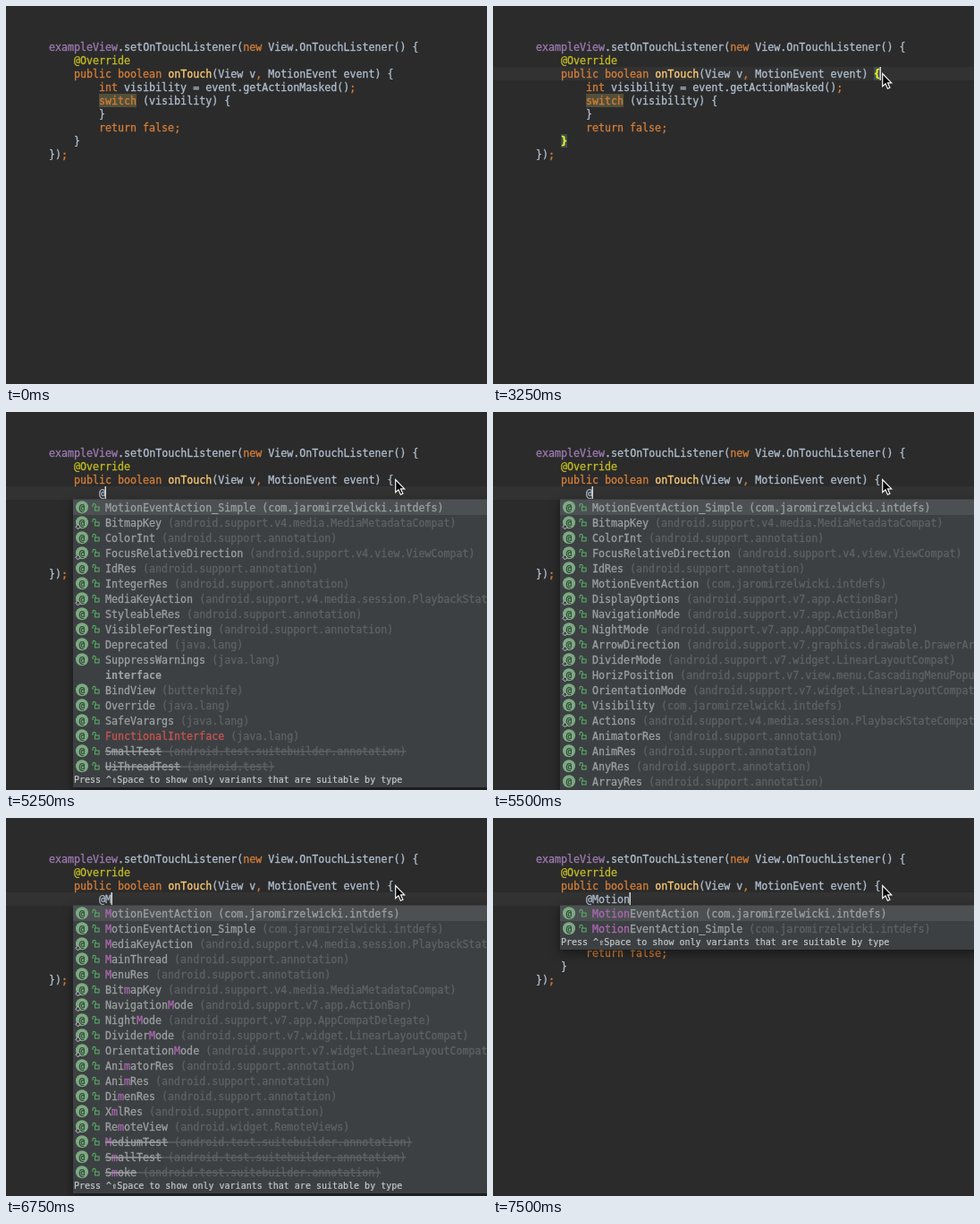
These frames come from a looping animation (538 px wide and 422 px high, 8000 ms). An HTML page:

```html
<!DOCTYPE html>
<html lang="en">
<head>
<meta charset="utf-8">
<title>Code completion</title>
<style>
  html, body { margin: 0; width: 100%; height: 100%; overflow: hidden; background: #2b2b2b; }
  svg { display: block; width: 538px; height: 422px; }
  /* about 7px per character; the thin stroke thickens the glyphs */
  text {
    font: 11.65px "DejaVu Sans Mono", monospace; white-space: pre;
    color: #b0bece; fill: currentColor; stroke: currentColor; stroke-width: .3px;
  }
  .field { color: #9d7bb2; }
  .note { color: #c2bc24; }
  .key { color: #d47e38; }
  .method { color: #ffcc74; }
  .brace { color: #ffef28; font-weight: bold; }
  .panel { fill: #3c4042; filter: drop-shadow(0 4px 6px rgba(0, 0, 0, .45)); }
  .name { color: #9c9fa0; }
  .pkg { color: #5f6264; }
  .picked .pkg { color: #9c9fa0; }
  .hit { color: #ab68b1; }
  .red { color: #c75450; }
  .gone tspan { text-decoration: line-through; }
  .gone .hit { text-decoration: none; }
  .word { color: #a2a6a8; font-weight: bold; stroke: none; }
  .at { font-size: 10.5px; color: #2c4032; text-anchor: middle; }
  .hint { font-size: 10px; color: #c6c8c9; stroke-width: .2px; }
</style>
</head>
<body>
<svg viewBox="0 0 538 422">
  <defs>
    <g id="badge">
      <circle cx="85" cy="8.3" r="7" fill="#7daa83"/>
      <text class="at" x="85" y="11.5">@</text>
      <g fill="none" stroke="#5aa866" stroke-width="1.1">
        <path d="M97 8V6a1.6 1.6 0 0 1 3.2 0V8"/>
        <rect x="99.5" y="8" width="4.6" height="4"/>
      </g>
    </g>
    <path id="nested" d="M80.5 10.5l2.7 2.7-2.7 2.7-2.7-2.7z" fill="#44494b" stroke="#c0c5c7"/>
  </defs>
  <g id="editor"></g>
  <g id="popup"></g>
  <path id="mouse" d="M0 0V14.2L3.3 11.2L5.7 16.8L8.2 15.7L5.8 10.3H10Z"
        fill="#050505" stroke="#f4f4f4" stroke-width="1.2"/>
</svg>
<script>
const LOOP = 8000, LINE = 15, ROW = 17, CHAR = 7, LEFT = 48, TOP = 38, LIST_TOP = 98;
const $ = id => document.getElementById(id);

const code = [
  'exampleView.setOnTouchListener(new View.OnTouchListener() {',
  '    @Override',
  '    public boolean onTouch(View v, MotionEvent event) {',
  '        int visibility = event.getActionMasked();',
  '        switch (visibility) {',
  '        }',
  '        return false;',
  '    }',
  '});'
];

const note = 'android.support.annotation', lang = 'java.lang', own = 'com.jaromirzelwicki.intdefs';
const v4 = 'android.support.v4.', v7 = 'android.support.v7.', test = 'android.test';
const packages = {
  MotionEventAction: own, MotionEventAction_Simple: own, Visibility: own,
  BitmapKey: v4 + 'media.MediaMetadataCompat',
  FocusRelativeDirection: v4 + 'view.ViewCompat',
  MediaKeyAction: v4 + 'media.session.PlaybackStateCompat',
  Actions: v4 + 'media.session.PlaybackStateCompat',
  DisplayOptions: v7 + 'app.ActionBar',
  NavigationMode: v7 + 'app.ActionBar',
  NightMode: v7 + 'app.AppCompatDelegate',
  ArrowDirection: v7 + 'graphics.drawable.DrawerArrowDrawable',
  DividerMode: v7 + 'widget.LinearLayoutCompat',
  OrientationMode: v7 + 'widget.LinearLayoutCompat',
  HorizPosition: v7 + 'view.menu.CascadingMenuPopup',
  RemoteView: 'android.widget.RemoteViews',
  Deprecated: lang, SuppressWarnings: lang, Override: lang, SafeVarargs: lang, FunctionalInterface: lang,
  BindView: 'butterknife',
  SmallTest: test + '.suitebuilder.annotation',
  MediumTest: test + '.suitebuilder.annotation',
  Smoke: test + '.suitebuilder.annotation',
  UiThreadTest: test
};

const words = s => s.split(' ');
const first = words('MotionEventAction_Simple BitmapKey ColorInt FocusRelativeDirection IdRes IntegerRes ' +
  'MediaKeyAction StyleableRes VisibleForTesting Deprecated SuppressWarnings interface BindView Override ' +
  'SafeVarargs FunctionalInterface SmallTest UiThreadTest');
const full = words('MotionEventAction_Simple BitmapKey ColorInt FocusRelativeDirection IdRes MotionEventAction ' +
  'DisplayOptions NavigationMode NightMode ArrowDirection DividerMode HorizPosition OrientationMode Visibility ' +
  'Actions AnimatorRes AnimRes AnyRes ArrayRes ColorRes');
const withM = words('MotionEventAction MotionEventAction_Simple MediaKeyAction MainThread MenuRes BitmapKey ' +
  'NavigationMode NightMode DividerMode OrientationMode AnimatorRes AnimRes DimenRes XmlRes RemoteView ' +
  'MediumTest SmallTest Smoke');
const withMo = words('MotionEventAction MotionEventAction_Simple NavigationMode NightMode DividerMode ' +
  'OrientationMode RemoteView Smoke');
const motion = withMo.slice(0, 2);

// typed: null until the new line exists
const steps = [
  { at: 0, typed: null },
  { at: 2500, typed: null, mouse: [395.5, 51] },
  { at: 2750, typed: null, mouse: [427.5, 68.5] },
  { at: 3000, typed: null, mouse: [435.7, 75.5] },
  { at: 3250, typed: null, clicked: true },
  { at: 4250, typed: '' },
  { at: 5000, typed: '@' },
  { at: 5250, typed: '@', list: first },
  { at: 5500, typed: '@', list: full },
  { at: 6750, typed: '@M', list: withM },
  { at: 7000, typed: '@Mo', list: withMo },
  { at: 7250, typed: '@Moti', list: motion },
  { at: 7500, typed: '@Motion', list: motion }
];

const span = (cls, s) => `<tspan class="${cls}">${s}</tspan>`;
const rect = (x, y, w, h, fill) => `<rect x="${x}" y="${y}" width="${w}" height="${h}" fill="${fill}"/>`;
const colX = col => LEFT + CHAR * col;
const rowY = row => TOP + LINE * row;

const rules = [
  ['field', /^exampleView/], ['note', /^@Override/], ['method', /^onTouch$/], ['key', /./]
];
function paint(s) {
  return s.replace(/exampleView|@Override|\b(?:new|public|boolean|int|switch|return|false|onTouch)\b|[,;]/g,
    token => span(rules.find(r => r[1].test(token))[0], token));
}

function codeLine(s, row) {
  const body = s.trimStart(), x = colX(s.length - body.length);
  const mark = body.startsWith('switch') ? rect(x, rowY(row), 6 * CHAR, LINE, '#52503a') : '';
  return `${mark}<text x="${x}" y="${rowY(row) + 12}">${paint(body)}</text>`;
}

function brace(s, col, row) {
  return rect(colX(col), rowY(row), CHAR, LINE, '#3b514d') +
    `<text class="brace" x="${colX(col)}" y="${rowY(row) + 12}">${s}</text>`;
}

function drawEditor({ typed, clicked }) {
  const lines = code.slice(), open = typed !== null;
  if (open) lines.splice(3, 0, ' '.repeat(8) + typed);
  const row = open ? 3 : 2, col = open ? 8 + typed.length : 55;
  const active = open || clicked;
  let out = active ? rect(0, rowY(row), 538, LINE, '#323232') : '';
  out += lines.map((s, i) => open && i === 3
    ? `<text x="${colX(8)}" y="${rowY(3) + 12}">${typed}</text>`
    : codeLine(s, i)).join('');
  if (clicked) out += brace('{', 54, 2) + brace('}', 4, 7);
  if (active) out += rect(colX(col) - .5, rowY(row), 1.5, LINE, '#d8d8d8');
  return out;
}

function item(name, i, query) {
  const y = LIST_TOP + ROW * i;
  if (name === 'interface') return `<text class="word" x="111" y="${y + 12.7}">${name}</text>`;
  const pkg = packages[name] || note;
  const hit = query ? name.toLowerCase().indexOf(query.toLowerCase()) : 0;
  const end = hit + query.length;
  const label = name.slice(0, hit) + span('hit', name.slice(hit, end)) + name.slice(end);
  const cls = name === 'FunctionalInterface' ? 'red' : 'name';
  const gone = pkg.startsWith(test) ? ' class="gone"' : '';
  return `<g transform="translate(0 ${y})"${i ? '' : ' class="picked"'}>
    ${i ? '' : rect(75, 0, 463, ROW, '#4c5052')}
    <use href="#badge"/>${/[A-Z]/.test(pkg) ? '<use href="#nested"/>' : ''}
    <text x="111" y="12.7"${gone}>${span(cls, label)}${span('pkg', ` (${pkg})`)}</text></g>`;
}

function drawPopup({ typed, list }) {
  if (!list) return '';
  const end = LIST_TOP + ROW * list.length;
  return `<rect class="panel" x="75" y="97" width="500" height="${end - 82}"/>` +
    list.map((name, i) => item(name, i, typed.slice(1))).join('') +
    `<text class="hint" x="76" y="${end + 10}">Press ^⇧Space to show only variants that are suitable by type</text>`;
}

const start = performance.now();
let shown;
function frame(now) {
  const t = Math.max(0, now - start) % LOOP;
  const i = steps.findLastIndex(s => s.at <= t);
  if (i !== shown) {
    shown = i;
    const step = steps[i];
    const spot = steps.slice(0, i + 1).findLast(s => s.mouse);
    $('editor').innerHTML = drawEditor(step);
    $('popup').innerHTML = drawPopup(step);
    $('mouse').style.display = spot ? '' : 'none';
    if (spot) $('mouse').setAttribute('transform', `translate(${spot.mouse})`);
  }
  requestAnimationFrame(frame);
}
frame(start);
</script>
</body>
</html>
```
